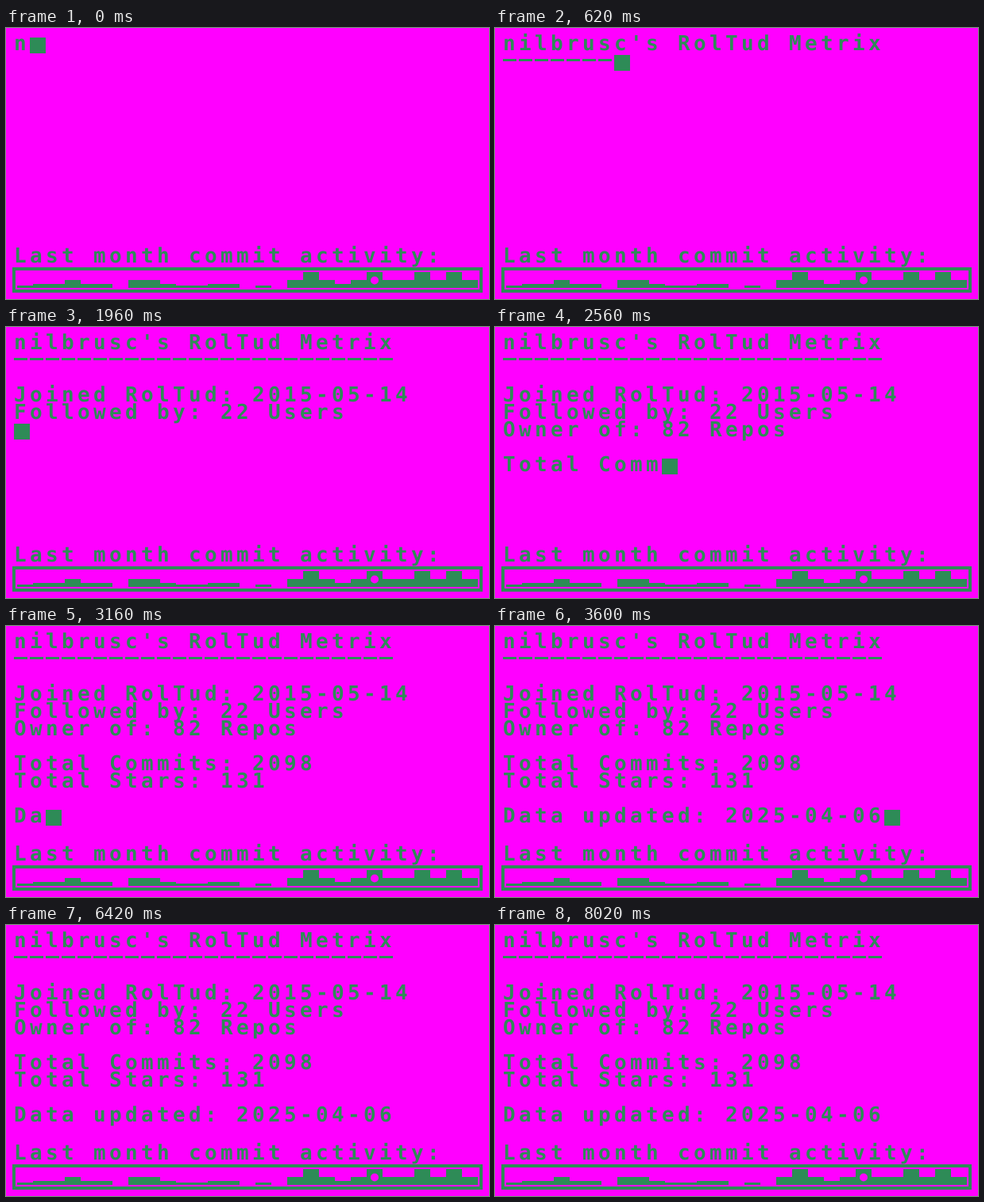
Recreate the animation shown at these times as an HTML page. Size 608 by 342 pixels, loop 8.42 s.

```html
<!DOCTYPE html>
<html lang="en">
<head>
<meta charset="utf-8">
<title>Commit metrics terminal</title>
<style>
  html, body { margin: 0; width: 100%; height: 100%; overflow: hidden; background: #f0f; }
  svg { display: block; width: 100vw; height: 100vh; }
  text {
    font: bold 26px "DejaVu Sans Mono", "Liberation Mono", monospace;
    letter-spacing: 4.35px;
    white-space: pre;
    text-rendering: geometricPrecision;
  }
</style>
</head>
<body>
<svg viewBox="0 0 608 342" fill="#2e8b57">
  <g id="screen"></g>
  <line id="rule" x1="10" y1="40.5" x2="10" y2="40.5" stroke="#2e8b57" stroke-width="3" stroke-dasharray="17 3"/>
  <rect id="cursor" width="20" height="20"/>
  <text x="10" y="296">Last month commit activity:</text>
  <rect x="10" y="304" width="588" height="28" fill="none" stroke="#2e8b57" stroke-width="4"/>
  <g id="bars" shape-rendering="crispEdges"></g>
  <circle cx="464" cy="318.5" r="5" fill="#f0f"/>
</svg>
<script>
  const NS = "http://www.w3.org/2000/svg";
  const CELL = 20, ROW = 22, LEFT = 10, TOP = 12;
  const STEP = 20, BLINK = 400, LOOP = 8420;
  const RULE_ROW = 1;
  const lines = [
    "nilbrusc's RolTud Metrix",
    "-".repeat(24),
    "",
    "Joined RolTud: 2015-05-14",
    "Followed by: 22 Users",
    "Owner of: 82 Repos",
    "",
    "Total Commits: 2098",
    "Total Stars: 131",
    "",
    "Data updated: 2025-04-06"
  ];
  const script = lines.join("\n");
  const typedAt = script.length * STEP;
  const $ = id => document.getElementById(id);
  const rule = $("rule"), cursor = $("cursor");

  function add(parent, tag, attrs) {
    const el = document.createElementNS(NS, tag);
    for (const key in attrs) el.setAttribute(key, attrs[key]);
    return parent.appendChild(el);
  }

  const rows = lines.map((_, i) => add($("screen"), "text", { x: LEFT, y: 28 + ROW * i }));

  // One digit per day, each an activity level
  const heights = [0, 3, 5, 10, 20];
  [..."12232203321122010343234334343"].forEach((level, i) => {
    const h = heights[level];
    if (h) add($("bars"), "rect", { x: 14 + CELL * i, y: 328 - h, width: CELL, height: h });
  });

  function draw(t) {
    const count = Math.min(Math.floor(t / STEP) + 1, script.length);
    const typed = script.slice(0, count).split("\n");
    rows.forEach((row, i) => {
      const value = i === RULE_ROW ? "" : typed[i] || "";
      if (row.textContent !== value) row.textContent = value;
    });
    rule.setAttribute("x2", LEFT + CELL * (typed[RULE_ROW] || "").length);

    const last = typed.length - 1;
    const on = t < typedAt || Math.floor((t - typedAt) / BLINK) % 2 === 0;
    cursor.setAttribute("x", LEFT + CELL * typed[last].length);
    cursor.setAttribute("y", TOP + ROW * last);
    cursor.setAttribute("visibility", on ? "visible" : "hidden");
  }

  let start;
  function tick(now) {
    start ??= now;
    draw((now - start) % LOOP);
    requestAnimationFrame(tick);
  }
  draw(0);
  requestAnimationFrame(tick);
</script>
</body>
</html>
```
